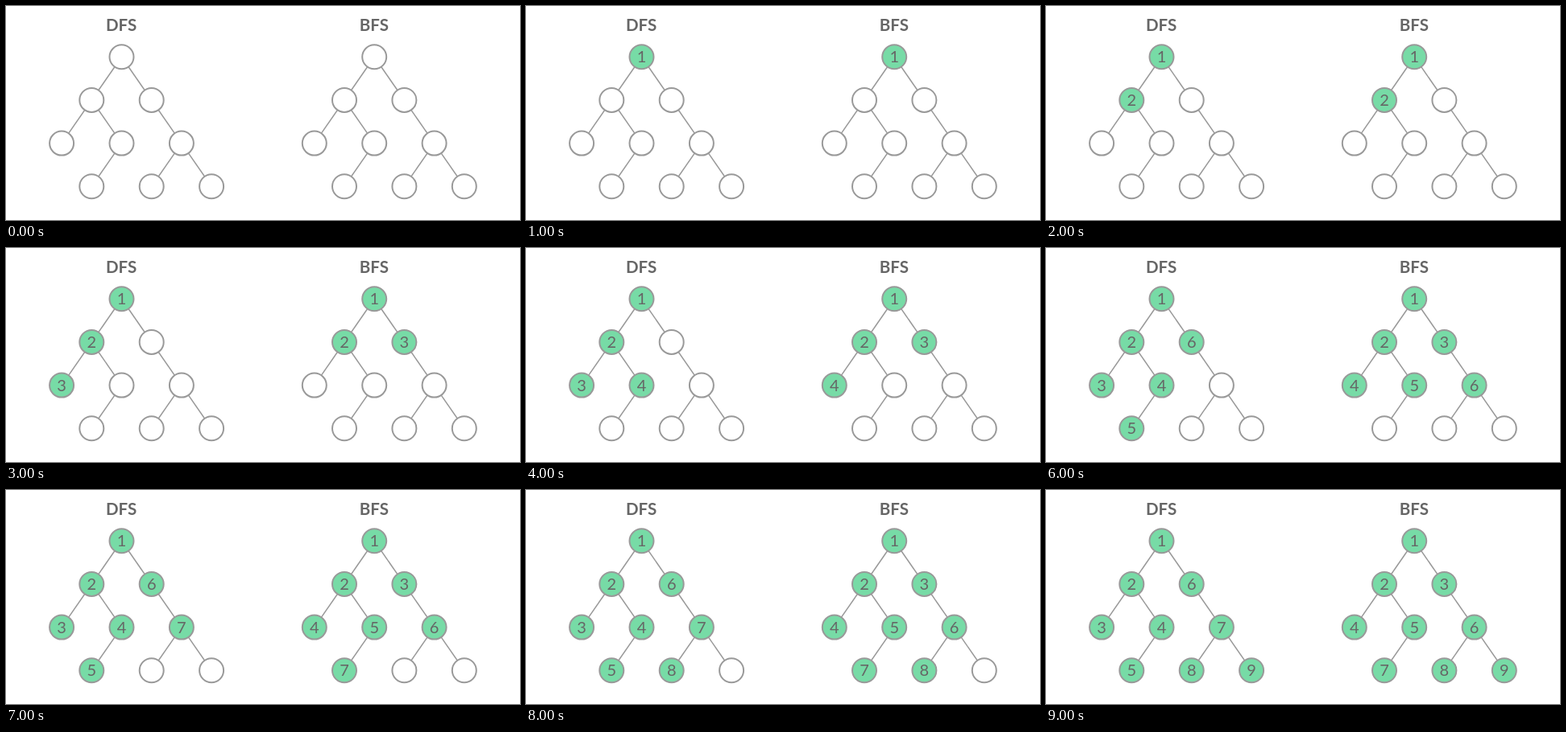
Animation of 638 by 266 pixels, one loop 10 s. Source, as an HTML page:

```html
<!DOCTYPE html>
<html lang="en">
<head>
<meta charset="utf-8">
<title>DFS and BFS</title>
<style>
  html, body { margin: 0; width: 100%; height: 100%; overflow: hidden; background: #fff; }
  svg { display: block; width: 638px; height: 266px; }
  text { font: 20px Lato, sans-serif; text-anchor: middle; fill: #666; }
  .title { font-size: 20.5px; font-weight: 700; }
  line { stroke: #999; stroke-width: 1.5; }
  circle { stroke: #999; stroke-width: 2; visibility: visible; }
  .node { fill: #fff; visibility: hidden; animation: 10s step-end infinite; }
</style>
</head>
<body>
<svg viewBox="0 0 638 266"></svg>
<script>
  const COL = 37.2, ROW = 53.65, TOP = 63.3, RADIUS = 15;

  const leaf = {};
  const root = {
    left: { left: leaf, right: { left: leaf } },
    right: { right: { left: leaf, right: leaf } }
  };

  // Each child sits one row below its parent, one column to the side.
  const children = ({ tree, x, y }) => [['left', -1], ['right', 1]]
    .filter(([side]) => tree[side])
    .map(([side, dir]) => ({ tree: tree[side], x: x + dir * COL, y: y + ROW, px: x, py: y }));

  // A stack gives depth-first order, a queue breadth-first order.
  function traverse(start, useStack) {
    const pending = [start], visited = [];
    while (pending.length) {
      const node = pending.shift();
      visited.push(node);
      if (useStack) pending.unshift(...children(node));
      else pending.push(...children(node));
    }
    return visited;
  }

  function drawTree(title, x, useStack) {
    const nodes = traverse({ tree: root, x, y: TOP }, useStack);
    const edges = nodes.slice(1).map(({ x, y, px, py }) =>
      `<line x1="${px}" y1="${py}" x2="${x}" y2="${y}"/>`);
    const discs = nodes.map(({ x, y }, i) =>
      `<g class="node" style="animation-name:visit${i + 1}">
        <circle cx="${x}" cy="${y}" r="${RADIUS}"/>
        <text x="${x}" y="${y + 6.9}">${i + 1}</text></g>`);
    return `<text class="title" x="${x - 0.4}" y="31">${title}</text>` + edges.join('') + discs.join('');
  }

  // One node is visited per second of the ten-second loop.
  const visits = traverse({ tree: root, x: 0, y: 0 }, true).map((_, i) =>
    `@keyframes visit${i + 1} {
      0% { fill: #fff; visibility: hidden }
      ${(i + 1) * 10}%, 100% { fill: #77dba6; visibility: visible }
    }`);

  document.querySelector('style').append(visits.join('\n'));
  document.querySelector('svg').innerHTML =
    drawTree('DFS', 143.5, true) + drawTree('BFS', 457.2, false);
</script>
</body>
</html>
```
